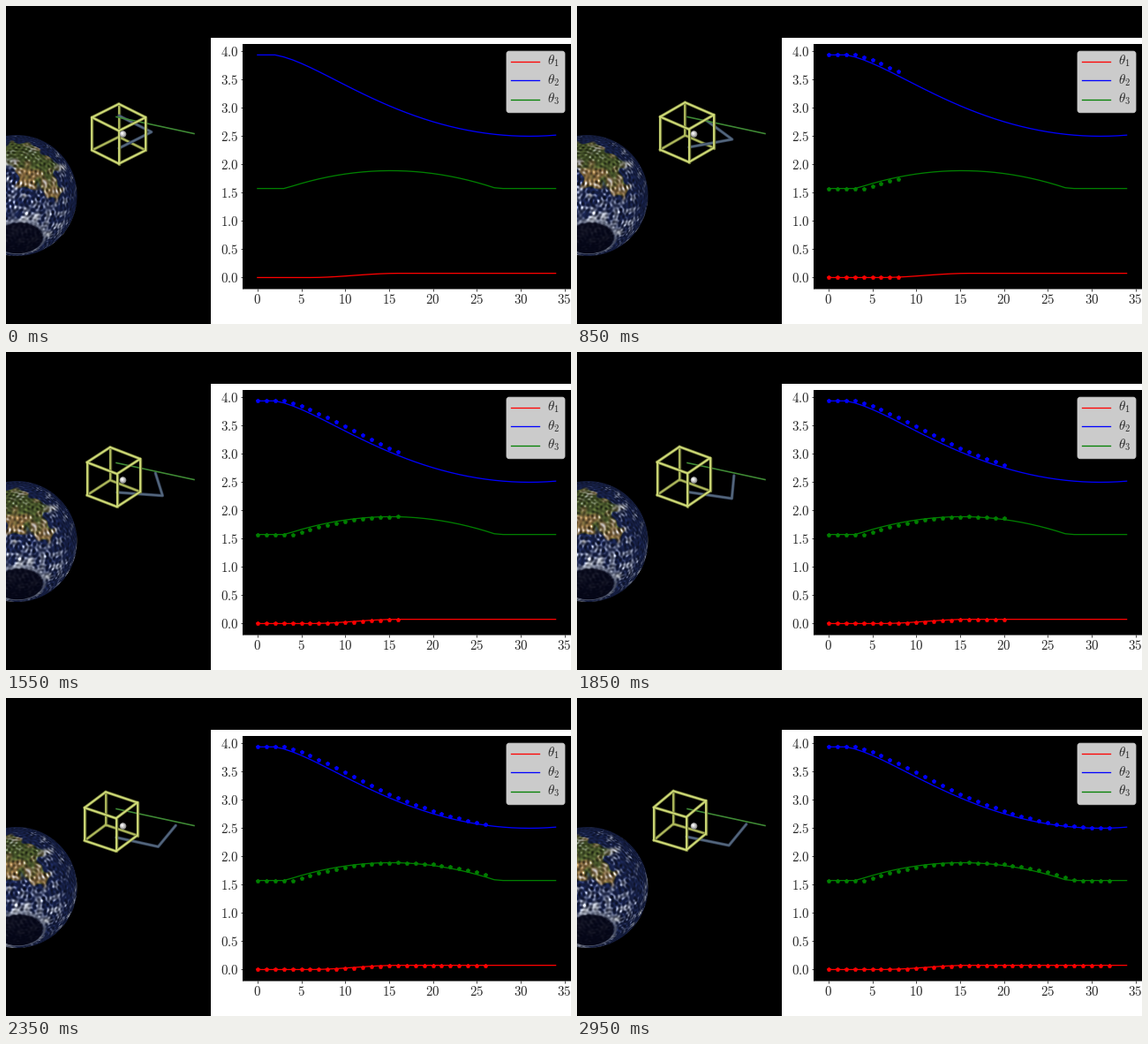
A matplotlib script that plays this animation: 640 px wide and 360 px high, repeating every 3 s.

```python
import numpy as np
import matplotlib.pyplot as plt
from matplotlib.animation import FuncAnimation
from matplotlib.collections import LineCollection
from matplotlib.patches import Circle, FancyBboxPatch, Rectangle

W, H, DPI = 640, 360, 80
FRAMES, STEP = 60, 50
RATE = 0.57  # joint samples per frame
PX = 72 / DPI  # points per pixel

plt.rcParams["mathtext.fontset"] = "cm"
plt.rcParams["font.family"] = "DejaVu Serif"
rng = np.random.default_rng(4)

fig = plt.figure(figsize=(W / DPI, H / DPI), dpi=DPI, facecolor="black")


def pixel_axes(z):
    ax = fig.add_axes([0, 0, 1, 1], zorder=z)
    ax.axis("off")
    ax.set(xlim=(0, W), ylim=(H, 0))
    return ax


# --------------------------------------------------------- joint angles
def theta1(t):
    u = np.clip((t - 6) / 10, 0, 1)
    return 0.075 * u * u * (3 - 2 * u)


def theta2(t):
    u = np.maximum(t - 2, 0) / 29
    low = 2.493
    return low + (1.25 * np.pi - low) * (1 - u) ** 2 * (1.25 - 0.25 * np.exp(-u / 0.17))


def theta3(t):
    return np.maximum(np.pi / 2, 1.885 - 0.00216 * (t - 15.2) ** 2)


# ---------------------------------------------------------------- Earth
CX, CY, R = 12, 214.5, 68.5
TOP, ROWS, COLS = 146, 138, 82
TILT = np.radians(50)
AXIS = np.array([-0.04, np.sin(TILT), -np.cos(TILT)])
AXIS /= np.linalg.norm(AXIS)


def on_globe(x, y):
    u, v = (np.asarray(x) - CX) / R, (CY - np.asarray(y)) / R
    return np.stack([u, v, np.sqrt(np.clip(1 - u * u - v * v, 0, 1))], -1)


def spin(p, a):
    along = (p @ AXIS)[..., None] * AXIS
    return along + (p - along) * np.cos(a) + np.cross(AXIS, p) * np.sin(a)


def field(freq, n=20):
    k = rng.normal(size=(n, 3))
    k *= freq / np.linalg.norm(k, axis=1)[:, None]
    phase = rng.uniform(0, 2 * np.pi, n)
    return lambda p: np.sin(p @ k.T + phase).sum(-1) * np.sqrt(2 / n)


def blobs(p, spots):
    return sum(np.exp((p @ on_globe(x, y) - 1) / (0.5 * (r / R) ** 2))
               for x, y, r in spots)


def mix(a, b, t):
    return a + (np.array(b) / 255 - a) * np.clip(t, 0, 1)[..., None]


GREEN = [(10, 162, 22), (42, 178, 20)]
BROWN = [(26, 194, 17), (54, 210, 13)]
coarse, medium, fine, grain = field(7), field(15), field(34), field(90, 24)

yy, xx = np.mgrid[0:ROWS, 0:COLS] + 0.5
yy += TOP
view = on_globe(xx, yy)
edge = np.clip(R - np.hypot(xx - CX, yy - CY) + 0.5, 0, 1)
south = -(view @ AXIS)
facing = view[..., 2]


def earth(a):
    p = spin(view, a)
    n1, n2, n3 = coarse(p), medium(p), fine(p)
    g = grain(p) * np.sqrt(facing)
    green, brown = blobs(p, GREEN), blobs(p, BROWN)
    soil = mix(np.zeros(view.shape), (70, 84, 42), np.ones(edge.shape))
    soil = mix(soil, (132, 104, 62), 0.9 * brown - 0.5 * green + 0.3 * n3 + 0.25)
    sea = mix(np.zeros(view.shape), (24, 34, 74), np.ones(edge.shape))
    land = green + brown + 0.12 * n2 + 0.1 * n3
    t = np.clip((land - 0.45) * 5, 0, 1)[..., None]
    rgb = sea * (1 - t) + soil * t
    cloud = 0.2 * n1 + 0.3 * n2 + 0.35 * n3 + 0.3 * g + 0.5 * south - 0.4 * land
    rgb = mix(rgb, (165, 170, 182), 0.6 * (cloud - 0.05))
    rgb = rgb * (1 + 0.22 * g[..., None])
    rgb = mix(rgb, (125, 132, 150), 0.6 * np.exp(-((south - 0.905) / 0.015) ** 2))
    rgb = mix(rgb, (4, 5, 22), np.clip((south - 0.91) * 60, 0, 0.9))
    rgb = rgb * (0.75 + 0.25 * facing[..., None])
    return np.dstack([np.clip(rgb, 0, 1), edge])


scene = pixel_axes(0)
globe = scene.imshow(earth(0), extent=(0, COLS, TOP + ROWS, TOP),
                     aspect="auto", interpolation="nearest")
scene.set(xlim=(0, W), ylim=(H, 0))

# ------------------------------------------------------------ satellite
SIDE, LINK = 43, 52
EDGES = [(r + i, r + (i + 1) % 4) for r in (0, 4) for i in range(4)]
EDGES += [(i, i + 4) for i in range(4)]
FAR = 5  # lower back corner
BACK = [e for e in EDGES if FAR in e]
FRONT = [e for e in EDGES if FAR not in e]


def ground(angle, radius):
    """Horizontal vector seen from 30 degrees above."""
    return radius * np.array([np.cos(angle), np.sin(angle) / 2])


def cube_corners(s, yaw):
    center = np.array([127.8 - 11.3 * s, 144.7 - 6 * s])
    lift = np.array([0, SIDE * np.sqrt(3) / 4])
    ring = [center + ground(np.pi + i * np.pi / 2 - yaw, SIDE / np.sqrt(2))
            for i in range(4)]
    return [c - lift for c in ring] + [c + lift for c in ring]


def arm_points(s, yaw, t):
    base = np.array([128 - 4 * s, 161 - 4 * s])
    a = np.pi - theta2(t) - yaw
    elbow = base + ground(a, LINK)
    return [base, elbow, elbow + ground(a - theta3(t), LINK)]


def tubes(z, dark, light):
    out = []
    for i, (color, width) in enumerate([(dark, 3.4), (light, 1.8)]):
        out.append(LineCollection([], colors=color, linewidths=width * PX,
                                  capstyle="round", zorder=z + 0.1 * i))
        scene.add_collection(out[-1], autolim=False)
    return out


back = tubes(2, "#5f6630", "#b2bc5e")
arm = tubes(3, "#35435a", "#56697f")
scene.plot([125, 213], [125.5, 144.5], color="#3f8a35", lw=1.6 * PX, zorder=4)
front = tubes(5, "#737a3a", "#d2de7a")
for r, c, d in [(3.8, "#8d8d8d", 0), (2.9, "#c4c4c4", 0.4), (1.6, "#f4f4f4", 0.8)]:
    scene.add_patch(Circle((132.5 - d, 145 - d), r, color=c, lw=0, zorder=6))

# ---------------------------------------------------------------- chart
INK = "#262626"
scene.add_patch(Rectangle((232, 36.3), W - 232, H - 36.3, color="white", lw=0, zorder=1))
LEFT, UP, RIGHT, DOWN = 268, 42.8, 639.5, 320
ax = fig.add_axes([LEFT / W, 1 - DOWN / H, (RIGHT - LEFT) / W, (DOWN - UP) / H],
                  facecolor="black", zorder=1)
ax.set(xlim=(-1.7, 35.7), ylim=(-0.196, 4.123))
ax.set_xticks(range(0, 36, 5), [f"${v}$" for v in range(0, 36, 5)])
ax.set_yticks(np.arange(9) / 2, [f"${v / 2:.1f}$" for v in range(9)])
ax.tick_params(length=2.5 * PX, width=0.7 * PX, labelsize=15 * PX, labelcolor=INK)
ax.tick_params(axis="x", pad=2.5 * PX)
ax.tick_params(axis="y", pad=2 * PX)
for spine in ax.spines.values():
    spine.set_linewidth(0.5 * PX)

time = np.arange(35)
lagged = np.maximum(time - 1, 0)
legend = pixel_axes(2)
legend.add_patch(FancyBboxPatch((567, 51.2), 66, 69.5, fc=(1, 1, 1, 0.8),
                                ec=(0.8, 0.8, 0.8, 0.8), lw=PX,
                                boxstyle="round,pad=0,rounding_size=3"))
series = []
for i, (f, color) in enumerate([(theta1, "red"), (theta2, "blue"), (theta3, "green")]):
    ax.plot(time, f(time), color=color, lw=1.3 * PX)
    dots, = ax.plot([], [], "p", color=color, ms=4.4 * PX, mew=0.8 * PX)
    series.append((dots, f(lagged)))
    y = 62.7 + 21.5 * i
    legend.plot([572, 604], [y, y], color=color, lw=1.3 * PX)
    legend.text(613, y + 4, rf"$\theta_{i + 1}$", size=15 * PX, color=INK, va="baseline")
legend.set(xlim=(0, W), ylim=(H, 0))


def draw(k):
    s = k / (FRAMES - 1)
    t = RATE * k
    yaw = np.radians(14) * s
    globe.set_data(earth(0.4 * s))
    cube = cube_corners(s, yaw)
    for layers, edges in ((back, BACK), (front, FRONT)):
        for layer in layers:
            layer.set_segments([(cube[i], cube[j]) for i, j in edges])
    for layer in arm:
        layer.set_segments([arm_points(s, yaw, t)])
    n = int(t + 0.25)
    for dots, values in series:
        dots.set_data(time[:n], values[:n])


anim = FuncAnimation(fig, draw, frames=FRAMES, interval=STEP, repeat=True,
                     repeat_delay=0, init_func=lambda: draw(0))
plt.show()
```
